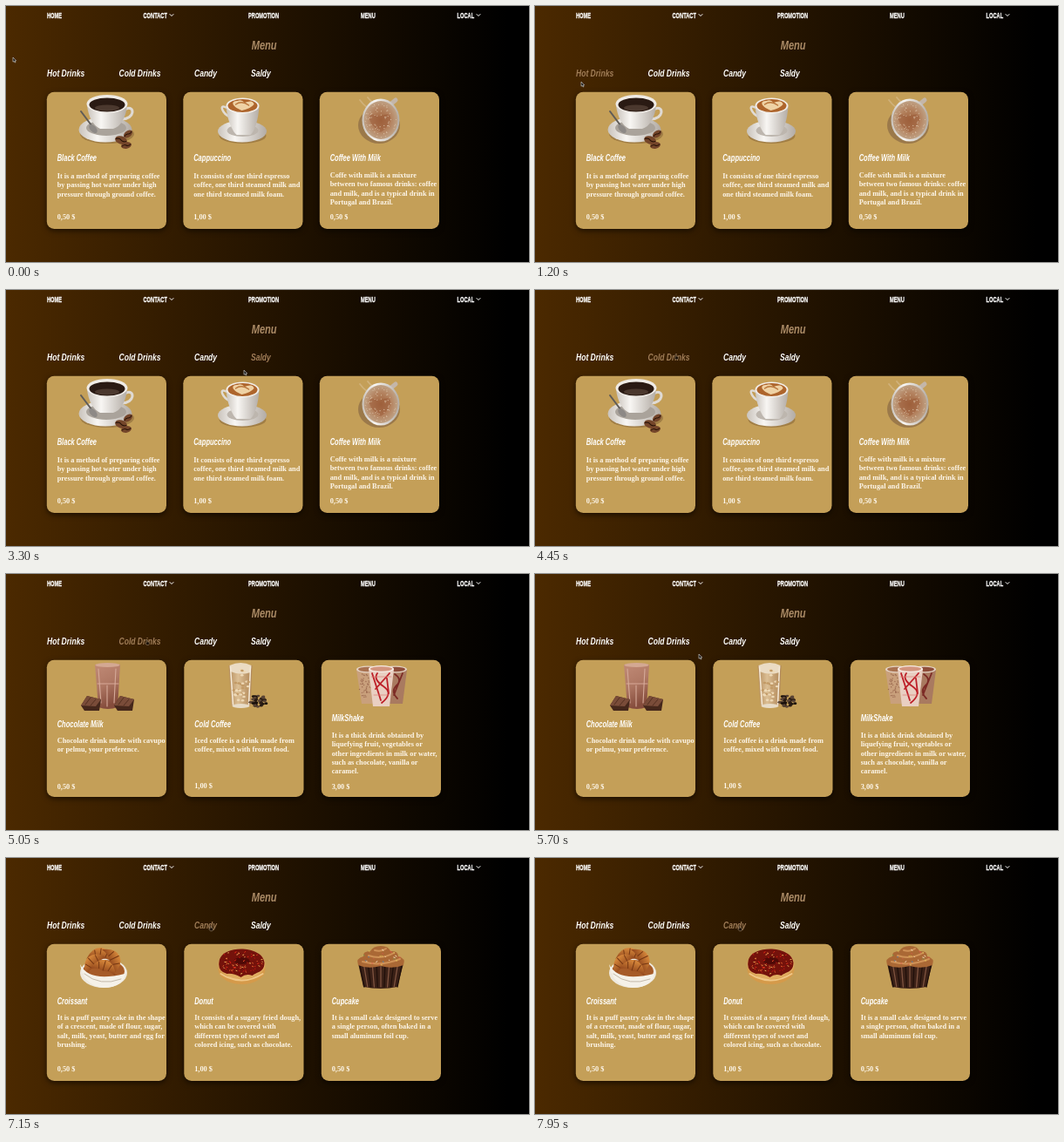
These frames come from a looping animation (600x294 px, 8 s). An HTML page:

```html
<!DOCTYPE html>
<html lang="en">
<head>
<meta charset="utf-8">
<title>Coffee menu</title>
<style>
  html, body { margin: 0; width: 100%; height: 100%; overflow: hidden; background: #000; }
  svg { display: block; width: 600px; height: 294px; background: linear-gradient(90deg, #4b2900, #000 575px); }
  .nav { font: bold 9.2px "Liberation Sans", Arial, sans-serif; fill: #fff; stroke: #fff; stroke-width: .35px; }
  .face { font: italic bold 11.7px "Liberation Sans", Arial, sans-serif; fill: #fff; }
  .heading { font-size: 15.2px; fill: #ab8b66; }
  .name { font-size: 10.3px; }
  .body { font: bold 8.3px "Liberation Serif", "Times New Roman", serif; fill: #fdf6ea; }
  .hover { fill: #a07d58; }
  .card { fill: #c49f58; filter: drop-shadow(0 2px 3px #0009); }
</style>
</head>
<body>
<svg id="stage" viewBox="0 0 600 294">
  <defs>
    <linearGradient id="china">
      <stop stop-color="#c9c3bc"/><stop offset=".35" stop-color="#f8f6f3"/><stop offset="1" stop-color="#b3aca5"/>
    </linearGradient>
    <linearGradient id="choco" x2=".3" y2="1">
      <stop stop-color="#c08a76"/><stop offset=".5" stop-color="#b07965"/><stop offset="1" stop-color="#854c3c"/>
    </linearGradient>
    <linearGradient id="latte">
      <stop stop-color="#b48c5c"/><stop offset=".4" stop-color="#dcbf95"/><stop offset="1" stop-color="#ae8455"/>
    </linearGradient>
    <radialGradient id="foam">
      <stop stop-color="#a0633c"/><stop offset=".6" stop-color="#b48360"/><stop offset="1" stop-color="#bfa184"/>
    </radialGradient>
    <linearGradient id="crust" x2="0" y2="1">
      <stop stop-color="#d98a3c"/><stop offset="1" stop-color="#8e431a"/>
    </linearGradient>
  </defs>
</svg>
<script>
const LOOP = 8000, STEP = 50, HOVER_LAG = 100;
const stage = document.getElementById("stage");

let seed = 20117;
const random = () => (seed = (seed * 16807) % 2147483647) / 2147483647;
const pick = list => list[Math.floor(random() * list.length)];

// Shape helpers
const oval = (x, y, rx, ry, fill, extra = "") =>
  `<ellipse cx="${x}" cy="${y}" rx="${rx}" ry="${ry}" fill="${fill}" ${extra}/>`;
const shape = (d, fill, extra = "") => `<path d="${d}" fill="${fill}" ${extra}/>`;
const line = (d, color, width = 1) =>
  shape(d, "none", `stroke="${color}" stroke-width="${width}" stroke-linecap="round"`);
const text = (kind, x, y, content) => `<text class="${kind}" x="${x}" y="${y}">${content}</text>`;
const condensed = (kind, x, y, content, ratio = .73) =>
  `<text class="${kind}" transform="translate(${x} ${y}) scale(${ratio} 1)">${content}</text>`;
const bean = (x, y, turn, size = 1) =>
  `<g transform="translate(${x} ${y}) rotate(${turn}) scale(${size})">` +
  oval(0, 0, 7, 4.6, "#74452a") + line("M-6 0Q-2 -2 0 0T6 0", "#2b1408", 1.2) + "</g>";
const scatter = (count, x, y, rx, ry, draw) => Array.from({ length: count }, () => {
  const angle = random() * 6.283, reach = Math.sqrt(random());
  return draw(x + Math.cos(angle) * rx * reach, y + Math.sin(angle) * ry * reach);
}).join("");
const sprinkles = (count, x, y, rx, ry, colors) => scatter(count, x, y, rx, ry, (px, py) =>
  line(`M${px} ${py}l${random() * 3 - 1.5} ${random() * 2 - 1}`, pick(colors), .9));

// Pictures, in card-local x and stage y
const blackCoffee =
  oval(69, 147, 31, 11, "#6b4d2866") +
  oval(67, 142, 30.5, 14.5, "url(#china)") + oval(68, 140, 23, 9, "#aaa39b") +
  line("M91 118C101 114 101 130 86 130", "#dfdad4", 3) +
  shape("M46 113C47 128 54 138 61 141H76C84 139 91 128 92 113Z", "url(#china)") +
  oval(69, 112.5, 23.5, 10.5, "#efebe6") + oval(69, 113.5, 20.5, 8, "#2a1a13") +
  oval(69, 117, 14, 3.5, "#4b382e") +
  line("M39 121L51 137", "#5f5c58", 2) + oval(53, 141, 6, 3.4, "#8d8986", 'transform="rotate(48 53 141)"') +
  bean(85, 154, 15) + bean(93, 147, -35, .8) + bean(91, 160, -12, .85);

const cappuccino =
  oval(68, 149, 27, 9, "#6b4d2866") +
  oval(67.5, 144, 28, 12.5, "url(#china)") + oval(68, 143, 18, 7, "#bdb6ae") +
  line("M50 117C40 111 44 124 55 128", "#e0dbd5", 2.5) +
  shape("M49 115C50 130 56 144 61 148H77C82 144 86 130 87 115Z", "url(#china)") +
  oval(68, 114.5, 19, 9, "#f2eee9") + oval(68, 114.5, 17, 7.5, "#ae652c") +
  shape("M67 120C55 115 54 109 62 109Q67 107 70 111Q80 107 81 113Q77 118 67 120Z", "#efd2a4") +
  line("M60 113Q67 108 75 114", "#b87439", 1.4);

const coffeeMilk =
  line("M46 108Q55 120 61 117M55 105Q62 114 67 111", "#d0b17a", 1.8) +
  oval(68, 137, 24, 21, "#79593e88") +
  line("M81 113L87 108", "#c4b6a8", 5) +
  oval(70, 131, 21.5, 24.5, "url(#china)") + oval(70, 131, 19.5, 22, "url(#foam)") +
  shape("M70 145C50 132 56 119 69 127C82 118 88 132 70 145Z", "#9d5d3b", 'opacity=".55"') +
  scatter(70, 70, 131, 18, 20, (x, y) => oval(x, y, .6, .6, "#d8bda2"));

const chocolateBlock = x =>
  shape(`M${x} 151L${x + 7} 140L${x + 23} 144L${x + 21} 157L${x + 4} 157Z`, "#45271b") +
  shape(`M${x} 151L${x + 7} 140L${x + 23} 144L${x + 17} 152Z`, "#7a4c39") +
  line(`M${x + 5} 150L${x + 11} 142M${x + 11} 151L${x + 17} 144`, "#553021");

const chocolateMilk =
  shape("M55 104H84L81 153Q70 157 59 153Z", "url(#choco)") +
  oval(69.5, 104.5, 14, 2.5, "#d3a893") +
  line("M59 109L62 148M79 109L77 148M69 128V152", "#d5aa99", 1.1) + line("M58 126H82", "#dcae9e", .9) +
  chocolateBlock(39) + chocolateBlock(77);

const coldCoffee =
  shape("M51 105H78L76 151Q65 156 54 151Z", "url(#latte)") +
  shape("M52 105Q65 99 77 105L76 113Q65 117 53 112Z", "#eadbc3") +
  line("M53 107L56 150M76 107L74 150", "#f5ead8", 1.5) +
  scatter(30, 65, 128, 9, 18, (x, y) => oval(x, y, 1.8, 1.2, pick(["#c29a66", "#eed9b6"]))) +
  oval(65, 151.5, 10, 2.5, "#e8dcc8") +
  scatter(42, 85, 146, 10, 7, (x, y) => oval(x, y, 2, 1.4, pick(["#2b1d15", "#5a4435", "#19100b"])));

const shakeCup = (x, color, fill) =>
  shape(`M${x} 110H${x + 26}L${x + 21} 149H${x + 6}Z`, color) +
  oval(x + 13, 109.5, 13, 4, "#e4d3c4") + oval(x + 13, 109.5, 11, 2.7, fill);

const milkShake =
  shakeCup(40, "#c9a07c", "#a97251") + shakeCup(72, "#a97a60", "#8f4d3a") +
  scatter(45, 50, 128, 7, 15, (x, y) => oval(x, y, .7, .7, "#9d6b51")) +
  line("M84 115Q93 121 86 128T87 143M93 114L83 139", "#7c2a25", 1.8) +
  shape("M54 109H83L78 152H59Z", "#e9cfc2") + oval(68.5, 109, 14.5, 4, "#f6ece5") +
  oval(68.5, 109, 12.5, 2.7, "#d3957f") +
  line("M58 114L68 145M64 114Q59 121 71 129T69 148M78 114L62 132M75 120L77 137", "#bd1e27", 1.8) +
  line("M57 118H80M60 139H77", "#d97970", .7);

const croissantPiece = (x, y, turn) =>
  `<g transform="translate(${x} ${y}) rotate(${turn})">` +
  shape("M-15 6Q-10 -9 1 -9Q12 -8 16 6Q8 1 1 4Q-7 1 -15 6Z", "url(#crust)") +
  line("M-7 -5L-5 2M0 -8V3M8 -5L6 2", "#753713", 1) + "</g>";

const croissant =
  oval(65, 132, 27, 17, "#eee9df") + oval(65, 130, 24, 13, "#a65b28") +
  croissantPiece(61, 112, 8) + croissantPiece(75, 116, 64) + croissantPiece(53, 121, -43) +
  croissantPiece(65, 126, 16) +
  shape("M38 122Q48 143 89 133L91 128Q89 149 65 149Q42 147 38 122Z", "#f5f1e8") +
  line("M43 133Q61 148 85 139", "#b5a997", .8);

const donut =
  oval(66, 128, 27, 17, "#d59a4a") + oval(66, 122, 27, 17, "#e0ac60") +
  shape("M40 119C42 99 90 100 92 120C92 131 85 130 78 135Q71 132 65 137Q56 132 49 133Q38 130 40 119Z", "#74120b") +
  oval(66, 118, 9, 4, "#4f0a07") +
  sprinkles(75, 66, 119, 24, 14, ["#e42c19", "#f46932", "#ce1712", "#f5c164"]) +
  line("M42 133Q66 148 90 133", "#f0c787", 2);

const cupcake =
  shape("M42 121H94L87 148Q68 152 48 148Z", "#3b2117") +
  Array.from({ length: 11 }, (_, i) =>
    line(`M${44 + i * 4.8} 124L${49 + i * 3.8} 148`, i % 2 ? "#805440" : "#20100b", 1.3)).join("") +
  shape("M42 123Q39 115 48 113Q47 107 56 107Q59 101 68 101Q77 101 79 107Q88 106 88 113Q97 115 94 123Q82 128 68 124Q53 128 42 123Z", "#aa6835") +
  line("M47 119Q68 125 90 116M54 112Q69 117 83 109M61 106Q69 108 74 104", "#cf9156", 2) +
  sprinkles(26, 68, 114, 22, 9, ["#e8c95b", "#478ac0", "#d55848", "#70a952", "#fff0d0"]);

// Card: picture, name, name baseline, first line baseline, price, price baseline, lines
const menus = [
  { from: 0, columns: [47, 203.5, 360], cards: [
    [blackCoffee, "Black Coffee", 178, 198, "0,50 $", 245,
      ["It is a method of preparing coffee", "by passing hot water under high", "pressure through ground coffee."]],
    [cappuccino, "Cappuccino", 178, 198, "1,00 $", 245,
      ["It consists of one third espresso", "coffee, one third steamed milk and", "one third steamed milk foam."]],
    [coffeeMilk, "Coffee With Milk", 178, 197, "0,50 $", 245,
      ["Coffe with milk is a mixture", "between two famous drinks: coffee", "and milk, and is a typical drink in", "Portugal and Brazil."]]
  ] },
  { from: 4700, columns: [47, 204.5, 362], cards: [
    [chocolateMilk, "Chocolate Milk", 175.5, 194, "0,50 $", 246.5,
      ["Chocolate drink made with cavupo", "or pelmu, your preference."]],
    [coldCoffee, "Cold Coffee", 175.5, 194, "1,00 $", 245.5,
      ["Iced coffee is a drink made from", "coffee, mixed with frozen food."]],
    [milkShake, "MilkShake", 169, 188, "3,00 $", 246.5,
      ["It is a thick drink obtained by", "liquefying fruit, vegetables or", "other ingredients in milk or water,", "such as chocolate, vanilla or", "caramel."]]
  ] },
  { from: 7000, columns: [47, 204.5, 362], cards: [
    [croissant, "Croissant", 167.5, 186, "0,50 $", 244.5,
      ["It is a puff pastry cake in the shape", "of a crescent, made of flour, sugar,", "salt, milk, yeast, butter and egg for", "brushing."]],
    [donut, "Donut", 167.5, 186, "1,00 $", 244.5,
      ["It consists of a sugary fried dough,", "which can be covered with", "different types of sweet and", "colored icing, such as chocolate."]],
    [cupcake, "Cupcake", 167.5, 186, "0,50 $", 245,
      ["It is a small cake designed to serve", "a single person, often baked in a", "small aluminum foil cup."]]
  ] }
];

const card = ([picture, name, nameY, bodyY, price, priceY, lines], x) =>
  `<g transform="translate(${x} 0)"><rect class="card" x="-.2" y="98.8" width="137.2" height="157.2" rx="8.5"/>` +
  picture + condensed("face name", 11.7, nameY, name) +
  lines.map((row, i) => text("body", 11.7, bodyY + i * 10.3, row)).join("") +
  text("body", 11.7, priceY, price) + "</g>";

const tabs = [["Hot Drinks", 47, 91], ["Cold Drinks", 129.5, 177], ["Candy", 216, 242], ["Saldy", 281, 304]];
const links = [["HOME", 47], ["CONTACT", 157.5], ["PROMOTION", 278], ["MENU", 407], ["LOCAL", 517.5]];

stage.insertAdjacentHTML("beforeend",
  links.map(([label, x]) => condensed("nav", x, 14, label, .62)).join("") +
  line("M188 9.5l2 2 2-2M540 9.5l2 2 2-2", "#fff", 1) +
  condensed("face heading", 281.7, 49.5, "Menu") +
  tabs.map(([label, x]) => condensed("face tab", x, 81, label)).join("") +
  menus.map(({ columns, cards }) =>
    `<g class="menu">${cards.map((item, i) => card(item, columns[i])).join("")}</g>`).join("") +
  `<g id="cursor">
    <path id="arrow" d="M0 0V5.2L1.2 4.2L2.1 6L3 5.6L2.2 3.9H3.7Z" fill="#111" stroke="#ddd" stroke-width=".6"/>
    <path id="hand" d="M0 0Q.8-.6 1.2.2V2L3.4 2.5V4.6L2.7 5.8H.4L-1.3 3.6L-.5 3.2L0 3.6Z" fill="#1b1006" stroke="#ac9478" stroke-width=".5"/>
  </g>`);

const tabNodes = [...stage.querySelectorAll(".tab")];
const menuNodes = [...stage.querySelectorAll(".menu")];
const cursor = document.getElementById("cursor");
const arrow = document.getElementById("arrow");
const hand = document.getElementById("hand");

// Pointer stops: time, x, y
const path = [
  [0, 8, 59], [250, 8, 59], [900, 35, 79], [1200, 53, 87], [1500, 70, 82], [1800, 88, 80],
  [2200, 145, 79], [2600, 225, 79], [2950, 291, 80], [3200, 283, 87], [3300, 273, 92],
  [3700, 232, 82], [4100, 175, 77], [4350, 161, 74], [5250, 161, 76], [5700, 188, 92],
  [6100, 225, 81], [6350, 234, 78], [8000, 234, 78]
];

function pointerAt(time) {
  const i = Math.max(1, path.findIndex(stop => stop[0] > time));
  const [t0, x0, y0] = path[i - 1], [t1, x1, y1] = path[i];
  const p = Math.max(0, (time - t0) / (t1 - t0)), eased = p * p * (3 - 2 * p);
  return [x0 + (x1 - x0) * eased, y0 + (y1 - y0) * eased];
}

const tabUnder = ([x, y]) =>
  tabs.findIndex(([, left, right]) => x >= left - 1 && x <= right + 1 && y > 70 && y < 90);

function render() {
  const time = Math.floor((performance.now() % LOOP) / STEP) * STEP;
  const pointer = pointerAt(time);
  const hovered = tabUnder(pointerAt(Math.max(0, time - HOVER_LAG)));
  const overText = tabUnder(pointer) >= 0 && pointer[1] < 85;
  const shown = menus.findLastIndex(menu => time >= menu.from);
  tabNodes.forEach((node, i) => node.classList.toggle("hover", i === hovered));
  menuNodes.forEach((node, i) => node.style.display = i === shown ? "" : "none");
  cursor.setAttribute("transform", `translate(${pointer})`);
  arrow.style.display = overText ? "none" : "";
  hand.style.display = overText ? "" : "none";
  requestAnimationFrame(render);
}
render();
</script>
</body>
</html>
```
